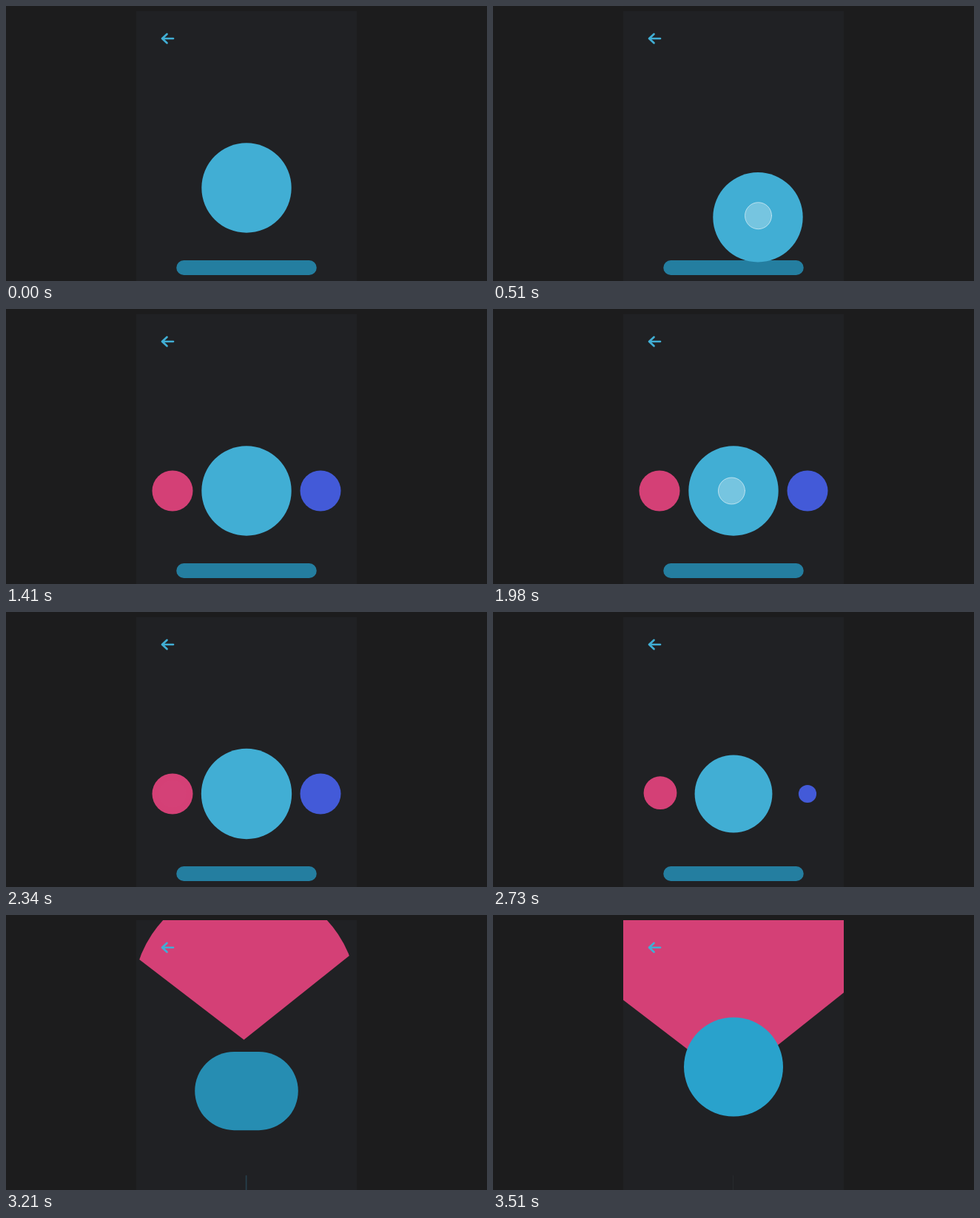
Animation of 650 by 372 pixels, one loop 4.53 s. Source, as an HTML page with a canvas:

```html
<!DOCTYPE html>
<html lang="en">
<head>
<meta charset="utf-8">
<title>Circle menu</title>
<style>
  html, body { margin: 0; height: 100%; overflow: hidden; background: #1c1c1d; }
  canvas { display: block; }
</style>
</head>
<body>
<canvas id="stage" width="650" height="372"></canvas>
<script>
const ctx = document.getElementById('stage').getContext('2d');
const LOOP = 4530;
const SKY = [65, 174, 212], TEAL = [36, 126, 160], AZURE = [41, 162, 204];
const PINK = [212, 64, 118], INDIGO = [67, 90, 216], FAINT = [39, 41, 45];
const CX = 325, CY = 246, BIG = 60.7, KID = 27.5, GAP = 100;

const clamp = v => Math.min(1, Math.max(0, v));
const span = (t, from, to) => clamp((t - from) / (to - from));
const easeOut = (u, power) => 1 - (1 - u) ** power;
const smooth = (t, from, to) => { const u = span(t, from, to); return u * u * (3 - 2 * u); };
const bump = (t, from, to) => Math.sin(Math.PI * span(t, from, to)) ** 2;
const lerp = (a, b, k) => a + (b - a) * k;
const mix = (a, b, k) => a.map((v, i) => lerp(v, b[i], k));
const rgb = c => `rgb(${c.map(Math.round)})`;

function disc(x, y, r, color) {
  if (r <= 0) return;
  ctx.fillStyle = color;
  ctx.beginPath();
  ctx.arc(x, y, r, 0, 2 * Math.PI);
  ctx.fill();
}

function pill(x, y, w, h, color) {
  ctx.fillStyle = color;
  ctx.beginPath();
  ctx.roundRect(x - w / 2, y, w, h, Math.min(w, h) / 2);
  ctx.fill();
}

// The main circle is dragged around in a shrinking loop, then pulses and collapses
function mainCircle(t) {
  const u = span(t, 15, 1010);
  return {
    x: CX - 33 * Math.sin(3 * Math.PI * u),
    y: CY - 64 * Math.sin(3 * Math.PI * u ** 1.27) * (1 - u ** 4) ** 1.5,
    r: BIG * (1 - span(t, 2500, 2880) ** 4) + 3.3 * (bump(t, 1030, 1270) + bump(t, 2300, 2640))
  };
}

// Filleted neck between the main circle and a side circle
function neck(side, gap, R, r, color) {
  const f = 12 * (1 - clamp((gap - 36) / 40));
  if (f <= 0 || gap + r <= R) return;
  const a = (gap * gap + (R + f) ** 2 - (r + f) ** 2) / (2 * gap);
  const h = Math.sqrt(Math.max(0, (R + f) ** 2 - a * a));
  if (h <= f) return;
  const outer = Math.atan2(h, a), inner = Math.atan2(h, a - gap);
  ctx.save();
  ctx.translate(CX, CY);
  ctx.scale(side, 1);
  ctx.fillStyle = color;
  ctx.beginPath();
  ctx.arc(a, h, f, outer + Math.PI, inner + Math.PI);
  ctx.arc(a, -h, f, Math.PI - inner, Math.PI - outer);
  ctx.fill();
  ctx.restore();
}

function drawKid(t, side, hue, x, y, r) {
  const gap = GAP * easeOut(span(t, 950, 1300), 2);
  if (gap === 0) return;
  const color = rgb(mix(SKY, hue, clamp((gap - 38) / 45)));
  if (gap < GAP) neck(side, gap, BIG, KID, color);
  disc(x + side * (gap - GAP), y, r, color);
}

function drawIndigo(t) {
  const r = KID * (1 - span(t, 2500, 2767) ** 4) + 1.2 * bump(t, 1680, 1860);
  drawKid(t, 1, INDIGO, CX + GAP, CY, r);
}

// The pink circle flies up, then floods the panel down to a V-shaped edge
function drawPink(t) {
  const fly = smooth(t, 2730, 3060);
  const r = KID + 1.2 * bump(t, 2100, 2300) - 5.1 * bump(t, 2600, 2860)
    + 17.5 * fly + 315 * span(t, 3060, 3320) ** 2;
  const apex = 178 - 16 * smooth(t, 3100, 3300) + 64.6 * smooth(t, 3290, 3510);
  ctx.save();
  if (t > 3050) {
    ctx.beginPath();
    ctx.moveTo(176, 7);
    ctx.lineTo(474, 7);
    ctx.lineTo(474, apex - 121.6);
    ctx.lineTo(321.5, apex);
    ctx.lineTo(176, apex - 111.6);
    ctx.clip();
  }
  drawKid(t, -1, PINK, lerp(CX - GAP + 1 * smooth(t, 2600, 2730), 323, fly),
    lerp(CY - 1.3 * smooth(t, 2600, 2730), 110, fly), r);
  ctx.restore();
}

// The bar rises and grows into the next main circle
function drawBar(t) {
  const u = span(t, 2780, 3510);
  const w = lerp(189.5, 134, easeOut(u, 2.57));
  const h = lerp(20, 134, easeOut(u, 1.58));
  const y = lerp(354, 205.5, easeOut(u, 1.7));
  pill(CX, y - h / 2, w, h, rgb(mix(TEAL, AZURE, smooth(t, 3060, 3400))));
}

function drawLine(t) {
  if (t < 2960) return;
  const k = smooth(t, 3060, 3290);
  pill(CX - k / 2, lerp(367, 352, smooth(t, 2960, 3160)), lerp(3.6, 1, k), 40, rgb(mix(TEAL, FAINT, k)));
}

function drawArrow() {
  ctx.strokeStyle = rgb(SKY);
  ctx.lineWidth = 2.7;
  ctx.lineCap = ctx.lineJoin = 'round';
  ctx.beginPath();
  ctx.moveTo(226, 44);
  ctx.lineTo(211, 44);
  ctx.moveTo(217.5, 38);
  ctx.lineTo(211, 44);
  ctx.lineTo(217.5, 50);
  ctx.stroke();
}

function drawTouch(x, y, alpha) {
  if (alpha <= 0) return;
  disc(x, y, 18, `rgba(255,255,255,${0.28 * alpha})`);
  ctx.strokeStyle = `rgba(255,255,255,${0.55 * alpha})`;
  ctx.lineWidth = 1;
  ctx.stroke();
}

function draw(t) {
  ctx.fillStyle = '#1c1c1d';
  ctx.fillRect(0, 0, 650, 372);
  ctx.fillStyle = '#202124';
  ctx.fillRect(176, 7, 298, 365);

  const main = mainCircle(t);
  drawLine(t);
  drawPink(t);
  drawBar(t);
  drawIndigo(t);
  disc(main.x, main.y, main.r, rgb(SKY));
  drawArrow();
  drawTouch(main.x + 0.5, main.y - 2, smooth(t, 20, 90) - smooth(t, 1030, 1110));
  drawTouch(lerp(CX + GAP, CX - GAP, smooth(t, 1744, 2210)), CY,
    smooth(t, 1690, 1760) - smooth(t, 2240, 2350));
}

const start = performance.now();
function tick() {
  draw((performance.now() - start) % LOOP);
  requestAnimationFrame(tick);
}
tick();
</script>
</body>
</html>
```
